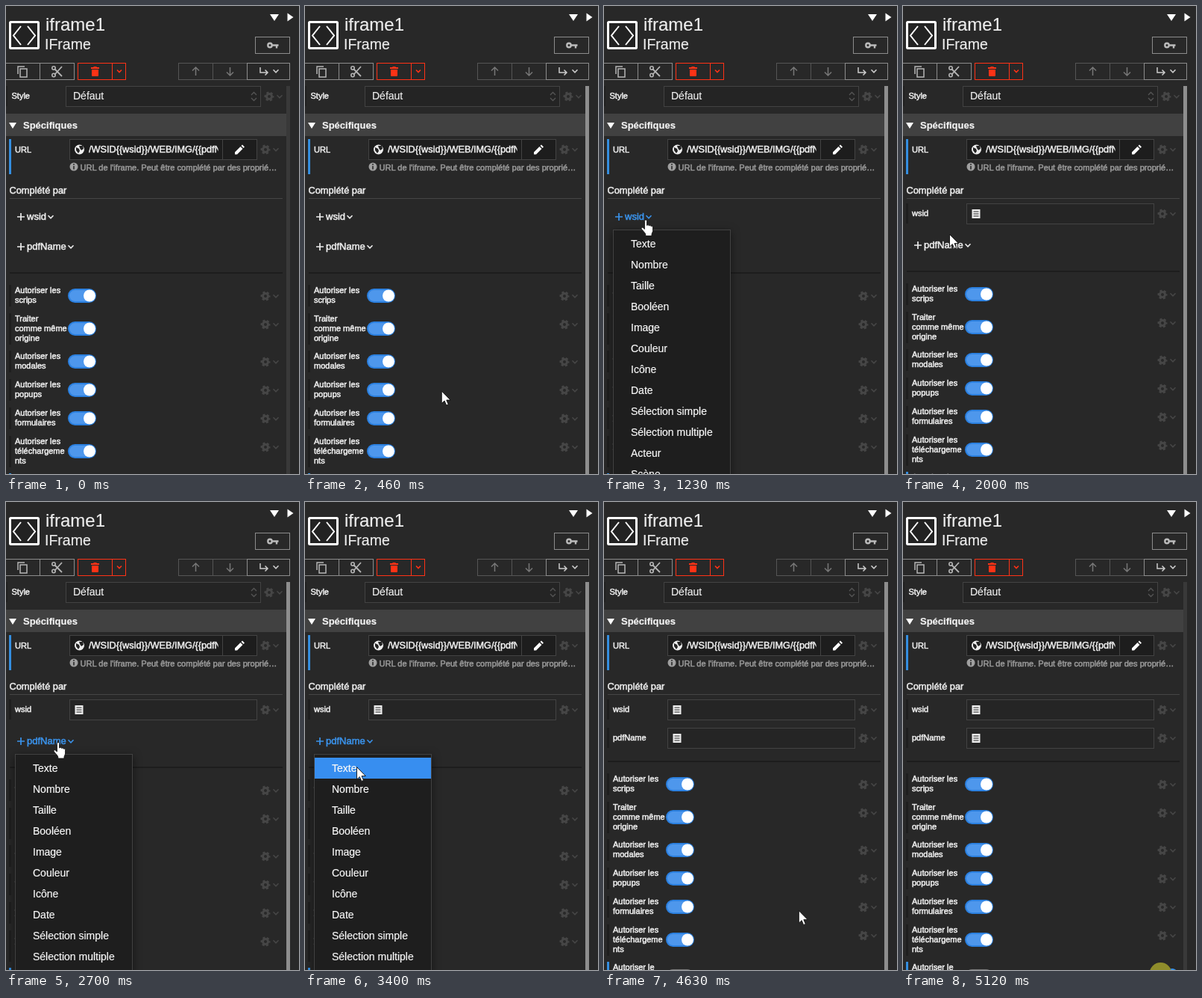
An HTML page that plays this animation: 393 by 626 pixels, repeating every 5200 ms.

```html
<!DOCTYPE html>
<html lang="fr">
<head>
<meta charset="utf-8">
<title>Propriétés IFrame</title>
<style>
html, body { margin: 0; width: 100%; height: 100%; overflow: hidden; background: #282828; }
svg { display: block; font-family: "Liberation Sans", Arial, sans-serif; }
text { white-space: pre; stroke-width: .2px; }
.med { stroke-width: .55px; }
#menu { filter: drop-shadow(0 3px 6px rgba(0,0,0,.5)); }
</style>
</head>
<body>
<svg id="stage" width="393" height="626" viewBox="0 0 393 626"></svg>
<script>
const LOOP = 5200, STEP = 70;
const WHITE = '#ececec', DIM = '#464646', BLUE = '#3a92ea', RED = '#ff3216';

// drawing helpers
const rect = (x, y, w, h, fill, extra = '') =>
  `<rect x="${x}" y="${y}" width="${w}" height="${h}" fill="${fill}" ${extra}/>`;
const box = (x, y, w, h, stroke, fill = 'none') =>
  rect(x + .5, y + .5, w - 1, h - 1, fill, `stroke="${stroke}"`);
const line = (d, color, width = 1.5) =>
  `<path d="${d}" fill="none" stroke="${color}" stroke-width="${width}"/>`;
const shape = (d, fill) => `<path d="${d}" fill="${fill}"/>`;
const text = (s, x, mid, size, color = WHITE, extra = '') =>
  `<text x="${x}" y="${Math.round(mid + size * .36)}" font-size="${size}" fill="${color}" stroke="${color}" ${extra}>${s}</text>`;
const medium = (s, x, mid, size, color) => text(s, x, mid, size, color, 'class="med"');

const chevron = (x, y, color, r = 3.5) => line(`M${x - r} ${y - r / 2}l${r} ${r}l${r} ${-r}`, color, 1.6);
const gear = (x, y) =>
  `<g fill="none" stroke="${DIM}"><circle cx="${x}" cy="${y}" r="3.500" stroke-width="3"/>` +
  `<circle cx="${x}" cy="${y}" r="5.300" stroke-width="2.400" stroke-dasharray="3 2.55" stroke-dashoffset="1.5"/></g>` +
  chevron(x + 14, y, DIM);
const doc = (x, y) => rect(x - 5.5, y - 6, 11, 12, WHITE) +
  line(`M${x - 3.5} ${y - 3}h7m-7 3h7m-7 3h7`, '#282828', 1.1);
const toggle = y => rect(84, y - 8.5, 36, 17, '#4e97ec', 'rx="8.5" stroke="#2b80e0" stroke-width="2"') +
  `<circle cx="112" cy="${y}" r="8" fill="#fff"/>`;
const link = (id, s, y, end) => `<g id="${id}" style="color:${WHITE}">` +
  line(`M15 ${y}h10m-5 -5v10`, 'currentColor', 1.7) +
  medium(s, 28, y - 1, 13, 'currentColor') + chevron(end, y, 'currentColor') + '</g>';
const field = (id, s, y) => `<g id="${id}">` + rect(4, y - 14, 3, 27, '#1f1f1f') +
  medium(s, 12, y - 1, 11) + box(85, y - 14, 252, 28, '#434343', '#252525') +
  doc(98, y) + gear(348, y) + '</g>';

function option(lines, y) {
  const n = lines.length;
  return rect(4, y - 7, 3, n * 13 + 3, '#1f1f1f') +
    lines.map((s, i) => medium(s, 12, y + i * 13, 11)).join('') +
    toggle(y + (n - 1) * 6 + 1.5) + gear(348, y + 8);
}

function header() {
  return rect(5.5, 21.5, 38, 35, '#222', 'rx="1" stroke="#fff" stroke-width="3"') +
    line('M20 27L10 39.5L20 52M29 27L39 39.5L29 52', '#fff', 2) +
    text('iframe1', 53, 24, 24) + text('IFrame', 52, 51, 19.5) +
    shape('M354 11h12l-6 9z', '#fff') + shape('M377.500 9.500v11l8-5.500z', '#fff') +
    box(334, 41, 47, 23, '#8c8c8c') +
    `<circle cx="354" cy="52.500" r="2.700" fill="none" stroke="#bbb" stroke-width="2.400"/>` +
    line('M357 52.500h8.500m-2.500 0v4', '#bbb', 2.4);
}

function toolbar() {
  const grey = '#8c8c8c', icon = '#b5b5b5', faint = '#555', arrow = '#777';
  return box(-1, 76, 47, 23, grey) + box(45, 76, 47, 23, grey) +
    box(96, 76, 47, 23, RED) + box(142, 76, 19, 23, RED) +
    box(231, 76, 47, 23, faint) + box(277, 76, 47, 23, faint) + box(323, 76, 58, 23, grey) +
    line('M16 91v-10h9M19 84h9v11h-9z', icon) +
    line('M65 84L75 94M65 92L75 81', icon, 1.8) +
    `<g fill="none" stroke="${icon}" stroke-width="1.600"><circle cx="64" cy="83" r="2.200"/><circle cx="64" cy="92.500" r="2.200"/></g>` +
    shape('M114 82h3l1-1h3l1 1h3v2h-11zM115 85h9v8q0 1 -1 1h-7q-1 0 -1 -1z', RED) +
    chevron(152, 87, RED, 3) +
    line('M254.500 93v-11m-4.500 4.500l4.500 -4.500l4.500 4.500', arrow) +
    line('M300.500 82v11m-4.500 -4.500l4.500 4.500l4.500 -4.500', arrow) +
    line('M341 82v7h10m-3.500 -3.500l3.500 3.500l-3.500 3.500', '#ccc') + chevron(362, 87, '#ccc');
}

function fixedRows() {
  return rect(0, 107, 2, 27, '#202020') + medium('Style', 7.5, 120.5, 11) +
    box(80, 107, 262, 28, '#434343', '#242424') + text('Défaut', 90, 120, 14) +
    line('M329 119l3.500 -3.500l3.500 3.500m-7 4l3.500 3.500l3.500 -3.500', '#555', 1.3) + gear(353, 121) +
    rect(0, 144, 376, 30, '#414141') + shape('M4 156h10l-5 8z', '#fff') +
    text('Spécifiques', 23, 159.5, 13, '#f2f2f2', 'font-weight="bold"') +
    rect(4, 178, 3, 47, '#348ee0') + medium('URL', 12, 192, 11) +
    box(85, 178, 206, 28, '#434343', '#1d1d1d') + box(290, 178, 47, 28, '#434343', '#1d1d1d') +
    `<circle cx="98.500" cy="192" r="6.500" fill="${WHITE}"/>` +
    shape('M94 189l4 2 1 3 -2 3 -3 -4zM98 187l5 0 1 4 -3 2 -2 -3z', '#222') +
    `<svg x="111" y="178" width="173.500" height="28">${medium('/WSID{{wsid}}/WEB/IMG/{{pdfName}}', 0, 13.5, 12.7)}</svg>` +
    shape('M307 195.500l7.500 -7.500 3 3 -7.500 7.500h-3zM315.500 187l1.500 -1.500 3 3 -1.500 1.500z', '#fff') +
    gear(348, 192) +
    `<circle cx="91" cy="215" r="5.500" fill="#a0a0a0"/>` + line('M91 211v1.800m0 1.200v4.500', '#282828', 1.6) +
    medium("URL de l'iframe. Peut être complété par des proprié…", 99.5, 216, 11.1, '#989898') +
    medium('Complété par', 4.5, 246, 12.8) + rect(5, 257, 366, 1, '#464646');
}

function lowerRows() {
  const options = [
    [['Autoriser les', 'scrips'], 380], [['Traiter', 'comme même', 'origine'], 418],
    [['Autoriser les', 'modales'], 468], [['Autoriser les', 'popups'], 506],
    [['Autoriser les', 'formulaires'], 544], [['Autoriser les', 'téléchargeme', 'nts'], 582]
  ];
  return '<g id="lower">' + rect(5, 356, 366, 2, '#1d1d1d') +
    options.map(o => option(...o)).join('') +
    rect(4, 625, 3, 40, '#348ee0') + medium('Autoriser le', 12, 632, 11) +
    rect(84, 636, 36, 17, '#555', 'rx="8.5" stroke="#777" stroke-width="2"') + '</g>';
}

const ITEMS = ['Texte', 'Nombre', 'Taille', 'Booléen', 'Image', 'Couleur', 'Icône', 'Date',
  'Sélection simple', 'Sélection multiple', 'Acteur', 'Scène'];
const menu = '<g id="menu">' + box(12, 0, 158, 346, '#424242', '#1e1e1e') +
  rect(13, 5, 156, 28, '#378ef0', 'id="hover"') +
  ITEMS.map((s, i) => text(s, 36, 19 + i * 28, 14, '#f8f8f8')).join('') + '</g>';

const ARROW = 'M0 0V16.500L3.800 13L6.300 19L9 17.800L6.500 12H11.800Z';
const HAND = 'M-1.600 2a1.600 1.600 0 0 1 3.200 0v6c.6-1 2.800-.8 3 .5.8-.8 2.600-.4 2.800.8.9-.6 2.200 0 2.200 1.200' +
  'v4.500c0 2-1.400 3-1.600 5V22H-.2v-2C-.6 18-4.600 14.500-5.800 12.600c-.8-1.400 1-2.500 2.400-1.400L-1.600 13z';

const stage = document.getElementById('stage');
stage.innerHTML = rect(0, 0, 393, 626, '#282828') + header() + toolbar() + fixedRows() +
  link('wsidLink', 'wsid', 282, 60) + link('pdfLink', 'pdfName', 322, 87) +
  field('wsidField', 'wsid', 278) + field('pdfField', 'pdfName', 316) + lowerRows() +
  rect(376, 107, 5, 519, '#8e8e8e', 'id="bar"') + menu +
  `<ellipse id="spot" cx="361" cy="630" rx="7" ry="6" fill="${BLUE}"/>` +
  '<circle id="press" cx="345.500" cy="631" r="15" fill="#8f8d2b"/>' +
  '<path id="cursor" fill="#fff" stroke="#111" stroke-width=".9"/>';

const $ = id => document.getElementById(id);
const show = (id, on) => { $(id).style.display = on ? '' : 'none'; };
const move = (id, x, y) => $(id).setAttribute('transform', `translate(${x} ${y})`);

// start, number of steps, end point
const PATH = [
  [250, 9, 88.5, 323.5], [880, 4, 56, 285.5], [1580, 3, 62.5, 305.5], [2290, 4, 70, 321],
  [2980, 7, 69.5, 354.5], [4010, 1, 73, 355], [4280, 1, 74, 355.5], [4350, 8, 345, 632]
];

function pointer(t) {
  let x = 250, y = 650;
  for (const [start, count, tx, ty] of PATH) {
    if (t < start) break;
    const k = Math.min(1, (Math.floor((t - start) / STEP) + 1) / count);
    const e = .5 - .5 * Math.cos(Math.PI * k);
    x += (tx - x) * e;
    y += (ty - y) * e;
  }
  return [x, y];
}

function draw(t) {
  const first = t >= 2000, second = t >= 3740;
  const openA = t >= 1230 && !first, openB = t >= 2700 && !second;
  const [x, y] = pointer(t);
  const top = openA ? 299 : 337;

  show('wsidLink', !first);
  show('wsidField', first);
  show('pdfLink', !second);
  show('pdfField', second);
  $('wsidLink').style.color = openA ? BLUE : WHITE;
  $('pdfLink').style.color = openB ? BLUE : WHITE;
  move('pdfLink', 0, first ? -2 : 0);
  move('lower', 0, second ? -10 : first ? -2 : 0);

  show('menu', openA || openB);
  move('menu', 0, top);
  show('hover', y >= top + 5);

  const inside = t >= 250 && t < 4840;
  $('bar').setAttribute('fill', inside ? '#8e8e8e' : '#393939');
  show('spot', t >= 5050);
  show('press', t >= 5120);

  const onLink = (cy, end) => Math.abs(y - cy) < 9 && x > 14 && x < end;
  const hand = (!first && onLink(282, 66)) ||
    (!second && !openA && onLink(first ? 320 : 322, 93));
  show('cursor', inside);
  $('cursor').setAttribute('d', hand ? HAND : ARROW);
  move('cursor', x, y);
}

const begin = performance.now();
function tick() {
  draw((performance.now() - begin) % LOOP);
  requestAnimationFrame(tick);
}
tick();
</script>
</body>
</html>
```
